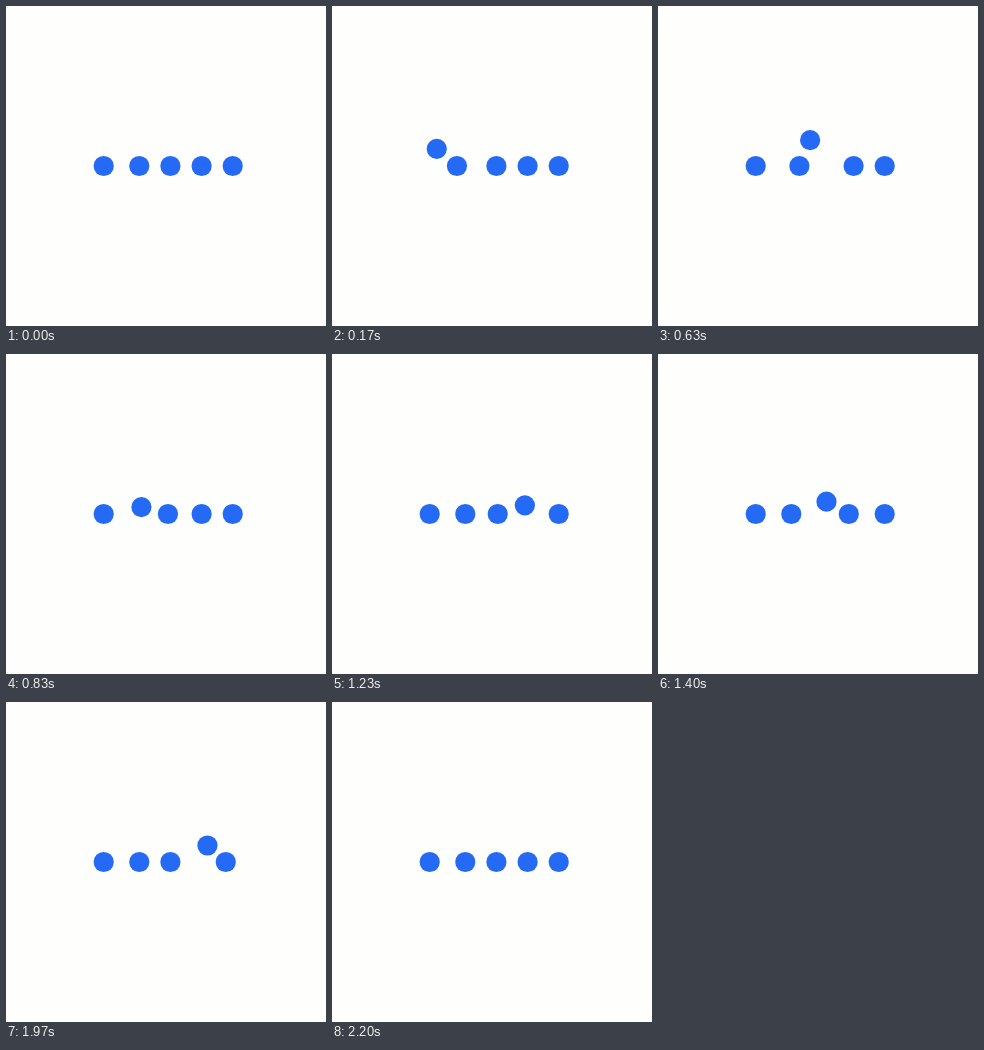
An HTML page for the animation above (2.23 s loop, 320 by 320 pixels).

```html
<!DOCTYPE html>
<html lang="en">
<head>
<meta charset="utf-8">
<title>Leapfrog dots</title>
<style>
  html, body { margin: 0; width: 100%; height: 100%; overflow: hidden; background: #fefefc; }
  svg { display: block; width: 100%; height: 100%; }
  circle { fill: #256af4; }
</style>
</head>
<body>
<svg viewBox="0 0 320 320"></svg>
<script>
  const LOOP = 2230;
  const BASE = 160;
  const RISE = 27;
  const slots = [97.7, 133.3, 164.4, 195.6, 226.7];
  // Start and end of each hop in ms
  const hops = [[0, 410], [555, 1000], [1200, 1600], [1800, 2200]];

  // Cubic bezier easing with control points (x1, 0) and (x2, 1)
  const bezier = (x1, x2) => x => {
    if (x <= 0) return 0;
    if (x >= 1) return 1;
    let lo = 0, hi = 1;
    for (let i = 0; i < 24; i++) {
      const u = (lo + hi) / 2, v = 1 - u;
      if (3 * v * v * u * x1 + 3 * v * u * u * x2 + u * u * u < x) lo = u;
      else hi = u;
    }
    return lo * lo * (3 - 2 * lo);
  };
  const slide = bezier(0.25, 0.1);
  const leap = bezier(0.185, 0.045);
  const mix = (a, b, p) => a + (b - a) * p;

  const svg = document.querySelector('svg');
  const dots = slots.map(() => {
    const dot = document.createElementNS(svg.namespaceURI, 'circle');
    dot.setAttribute('r', 10.1);
    return svg.appendChild(dot);
  });

  function place(dot, x, y) {
    dot.setAttribute('cx', x);
    dot.setAttribute('cy', y);
  }

  // The first dot slides right while each neighbour leaps back over it
  function draw(time) {
    let x = slots[0];
    hops.forEach(([start, end], i) => {
      const t = (time - start) / (end - start);
      const p = leap(t);
      x += (slots[i + 1] - slots[i]) * slide(t);
      place(dots[i + 1], mix(slots[i + 1], slots[i], p), BASE - RISE * 4 * p * (1 - p));
    });
    place(dots[0], x, BASE);
  }

  const began = performance.now();
  function tick() {
    draw((performance.now() - began) % LOOP);
    requestAnimationFrame(tick);
  }
  tick();
</script>
</body>
</html>
```
